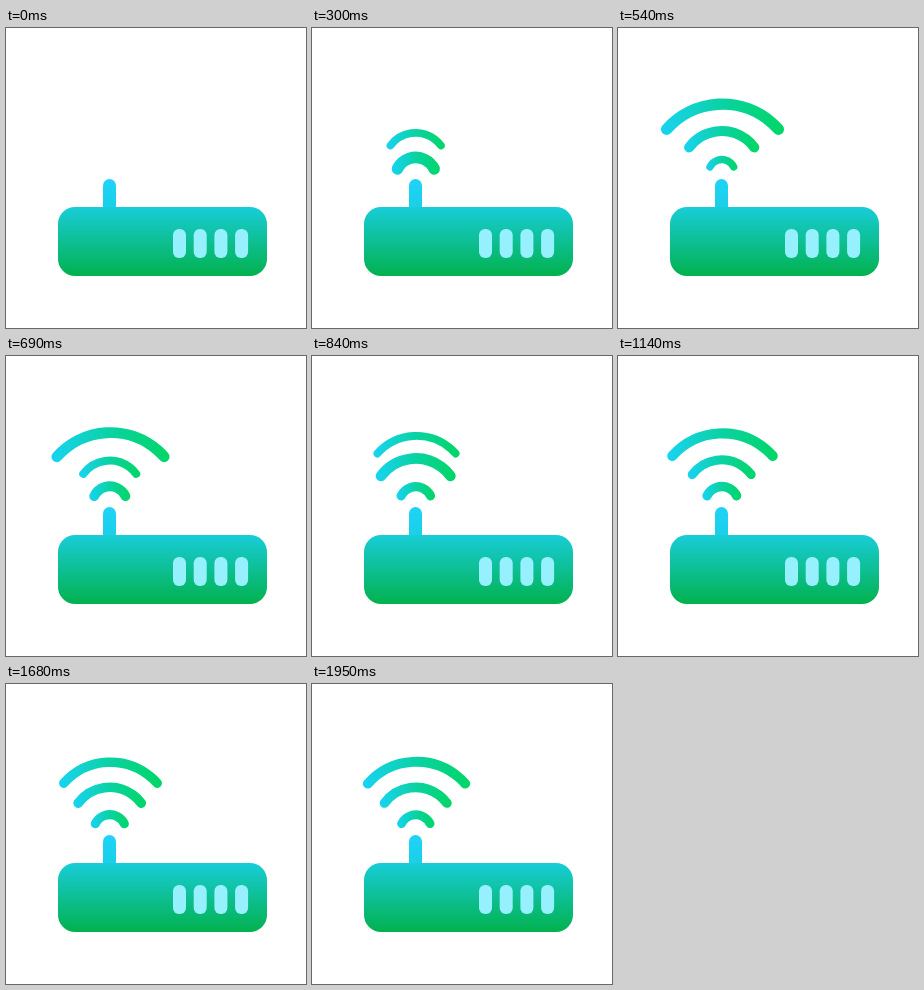
An HTML page with a canvas that plays this animation: 300x300 px, repeating every 1.98 s.

```html
<!DOCTYPE html>
<html lang="en">
<head>
<meta charset="utf-8">
<title>Router</title>
<style>
  html, body { margin: 0; width: 100%; height: 100%; overflow: hidden; background: #fff; }
  canvas { display: block; width: 300px; height: 300px; }
</style>
</head>
<body>
<canvas id="stage" width="300" height="300"></canvas>
<script>
const ctx = document.getElementById('stage').getContext('2d');
const LOOP = 1980, STEP = 30;
const GROW = 0.13, AMP = 0.36, PERIOD = 0.45, DECAY = 2;

// land: time in seconds when the arc first reaches full size
const arcs = [
  { x: 103.8, y: 135.2, half: 14.3, rise: 8.9, line: 9, land: 0.185 },
  { x: 103.7, y: 111.2, half: 31.5, rise: 15.8, line: 9.7, land: 0.326 },
  { x: 104.5, y: 88.7, half: 47.8, rise: 21.5, line: 9.7, land: 0.502 }
];

function gradient(x0, y0, x1, y1, colors) {
  const g = ctx.createLinearGradient(x0, y0, x1, y1);
  colors.forEach((c, i) => g.addColorStop(i / (colors.length - 1), c));
  return g;
}

function box(x, y, w, h, radii, fill) {
  ctx.beginPath();
  ctx.roundRect(x, y, w, h, radii);
  ctx.fillStyle = fill;
  ctx.fill();
}

// Linear growth, then a decaying bounce around full size
function scaleAt(t) {
  if (t <= -GROW) return 0;
  if (t < 0) return 1 + t / GROW;
  return 1 + AMP * Math.sin(2 * Math.PI * t / PERIOD) * Math.exp(-DECAY * t);
}

function drawArc(a, time) {
  const s = scaleAt(time - a.land);
  if (s <= 0) return;
  const r = (a.half ** 2 + a.rise ** 2) / (2 * a.rise);
  const spread = Math.asin(a.half / r);
  const edge = a.half + a.line / 2;
  ctx.save();
  ctx.translate(a.x, a.y);
  ctx.scale(s, s);
  ctx.beginPath();
  ctx.arc(0, r - a.rise / 2, r, -Math.PI / 2 - spread, -Math.PI / 2 + spread);
  ctx.lineWidth = a.line;
  ctx.lineCap = 'round';
  ctx.strokeStyle = gradient(-edge, 0, edge, 0, ['#18d3f2', '#0ad2a2', '#02d666']);
  ctx.stroke();
  ctx.restore();
}

function drawRouter() {
  box(97, 151, 13, 32, [6.5, 6.5, 0, 0], gradient(0, 151, 0, 181, ['#1fd3f8', '#1acfe6']));
  box(52, 179, 209, 69, 17, gradient(0, 179, 0, 248, ['#18cdd8', '#02b14e']));
  for (let i = 0; i < 4; i++) box(167 + i * 20.7, 201, 13, 29, 6, '#97f0fd');
}

function draw(ms) {
  const time = Math.floor(ms % LOOP / STEP) * STEP / 1000;
  ctx.fillStyle = '#fff';
  ctx.fillRect(0, 0, 300, 300);
  drawRouter();
  arcs.forEach(a => drawArc(a, time));
}

const start = performance.now();
function tick() {
  draw(performance.now() - start);
  requestAnimationFrame(tick);
}
tick();
</script>
</body>
</html>
```
